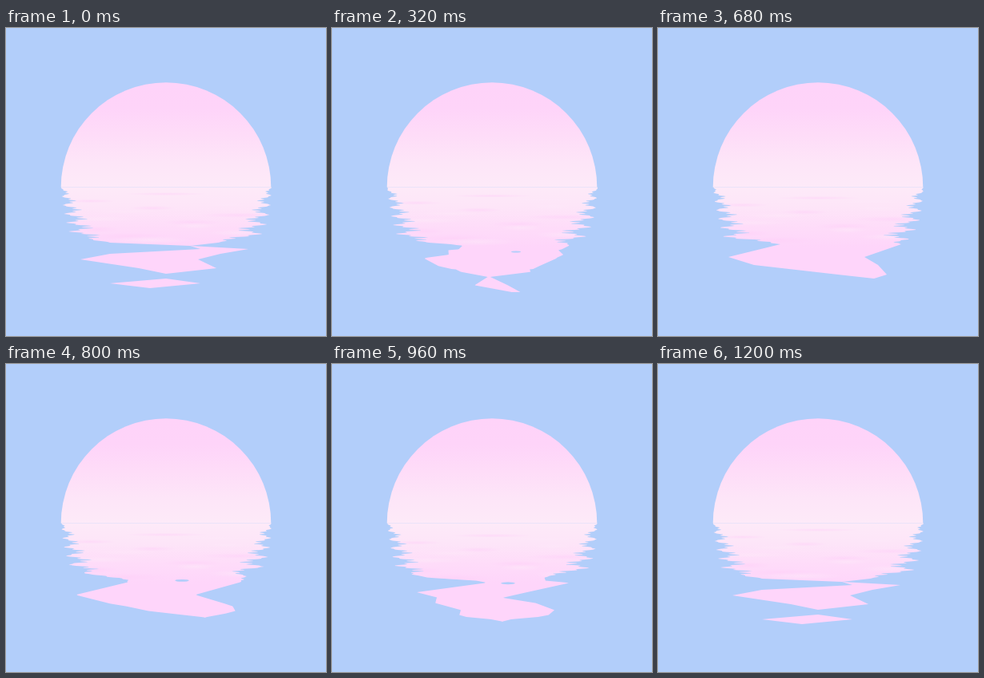
Animation, 400 px wide and 386 px high, one loop 1240 ms. Source, as an HTML page with a canvas:

```html
<!DOCTYPE html>
<html lang="en">
<head>
<meta charset="utf-8">
<title>Sun over water</title>
<style>
  html, body { margin: 0; height: 100%; overflow: hidden; background: #b2cefa; }
  canvas { display: block; }
</style>
</head>
<body>
<canvas id="stage" width="400" height="386"></canvas>
<script>
const ctx = document.getElementById('stage').getContext('2d');
const SKY = '#b2cefa', HORIZON = 199.5, BOTTOM = 331, CYCLE = 1200, STEP = 40;
const DRIFT = 0.00028; // waves come nearer: depth grows by this share per ms

// Near water as rows of [y, left, right], with an optional hole [x, y, radius].
const poses = [];
const pose = (time, rows, hole) => poses.push({ time, rows, hole });

pose(0, [[269,130,265], [273,230,230], [277,243,303], [283,130,268], [290,93,240],
  [301,166,263], [308,200,200], [314,200,200], [320,130,243], [326,180,180]]);
pose(160, [[269,130,290], [274,203,303], [284,95,280], [294,85,284], [301,115,289],
  [307,182,188], [317,149,232], [327,262,270]], [230,277,24]);
pose(480, [[276,190,302], [282,98,265], [288,158,290], [293,137,280], [307,200,215]]);
pose(680, [[271,153,304], [287,88,258], [297,120,275], [309,225,286], [314,270,270]]);
pose(880, [[264,110,286], [272,165,298], [291,86,222], [306,152,287], [312,165,289],
  [320,235,235]], [220,273,22]);
pose(1080, [[270,112,230], [274,225,225], [277,235,298], [289,93,235], [296,200,200],
  [303,152,262], [312,175,265], [321,141,235], [324,180,180]]);
poses.push({ ...poses[0], time: CYCLE });

const mix = (a, b, u) => a + (b - a) * u;
const move = (y, ms) => HORIZON + (y - HORIZON) * Math.exp(DRIFT * ms);

// Pointed ripples along the far water, one spacing further down each cycle.
function ripple(y, t) {
  const depth = Math.max(0, y - HORIZON), reach = Math.min(10, depth) + depth * .5;
  const notch = (first, gap) => {
    const p = (y - first) / gap - t / CYCLE;
    return reach * Math.abs(Math.sin(Math.PI * p)) * (.75 + .25 * Math.sin(2.1 * y + p));
  };
  return [
    69 + 25 * (depth / 92) ** 2 + notch(222, 11),
    332 - 24 * (depth / 75) ** 3 - notch(222, 12)
  ];
}

function edges(rows, y, far) {
  const [top] = rows[0], next = rows.findIndex(row => row[0] > y);
  if (next < 0) {
    const [, l, r] = rows[rows.length - 1];
    return [(l + r) / 2, (l + r) / 2];
  }
  const [y0, ...from] = next ? rows[next - 1] : [top - 7, ...far];
  const [y1, ...to] = rows[next];
  const u = Math.max(0, (y - y0) / (y1 - y0));
  return from.map((x, side) => mix(x, to[side], u));
}

function vertical(y0, y1, ...colors) {
  const g = ctx.createLinearGradient(0, y0, 0, y1);
  colors.forEach((color, i) => g.addColorStop(i / (colors.length - 1), color));
  return g;
}

const sunFill = vertical(68, 200, '#fed3f9', '#fed4f9', '#fedcf8', '#fde5f8', '#fdeaf8');
const waterFill = vertical(199, 275, '#fdeaf8', '#fde5f8', '#fedcf9', '#fed5fa');

function wisp(x, y, rx, ry, rgb) {
  ctx.save();
  ctx.translate(x, y);
  ctx.scale(rx, ry);
  const g = ctx.createRadialGradient(0, 0, 0, 0, 0, 1);
  g.addColorStop(0, `rgba(${rgb},.55)`);
  g.addColorStop(1, `rgba(${rgb},0)`);
  ctx.fillStyle = g;
  ctx.fillRect(-1, -1, 2, 2);
  ctx.restore();
}

function drawHole(hole, ms, size) {
  if (!hole || size <= 0) return;
  const [x, y, radius] = hole;
  ctx.fillStyle = SKY;
  ctx.beginPath();
  ctx.ellipse(x, move(y, ms), radius * size, radius * size / 6, 0, 0, 7);
  ctx.fill();
}

function drawWater(t) {
  const next = poses.findIndex(p => p.time > t);
  const a = poses[next - 1], b = poses[next];
  const since = t - a.time, until = b.time - t, u = since / (b.time - a.time);
  const lefts = [], rights = [];
  for (let y = HORIZON; y <= BOTTOM; y += .5) {
    const far = ripple(y, t);
    const ea = edges(a.rows, move(y, -since), far);
    const eb = edges(b.rows, move(y, until), far);
    let [l, r] = ea.map((x, side) => mix(x, eb[side], u));
    if (l > r) l = r = (l + r) / 2;
    lefts.push([l, y]);
    rights.unshift([r, y]);
  }
  ctx.save();
  ctx.beginPath();
  [...lefts, ...rights].forEach(p => ctx.lineTo(...p));
  ctx.closePath();
  ctx.fillStyle = waterFill;
  ctx.fill();
  ctx.clip();
  for (let i = 0; i < 14; i++) {
    const depth = (i + 2 * t / CYCLE) / 14 % 1;
    const x = 200 + 95 * Math.sin(i * 2.4);
    wisp(x, 208 + 62 * depth, 38 + 14 * Math.cos(i), 2 + 3 * depth, i % 2 ? '253,232,249' : '254,208,248');
  }
  ctx.restore();
  drawHole(a.hole, since, 1 - 1.5 * u);
  drawHole(b.hole, -until, 1.5 * u - .5);
}

function draw(now) {
  const t = Math.floor(now % (CYCLE + STEP) / STEP) * STEP % CYCLE;
  ctx.fillStyle = SKY;
  ctx.fillRect(0, 0, 400, 386);
  drawWater(t);
  ctx.fillStyle = sunFill;
  ctx.beginPath();
  ctx.arc(200, HORIZON, 131.3, Math.PI, 0);
  ctx.fill();
}

let start;
function tick(now) {
  start ??= now;
  draw(now - start);
  requestAnimationFrame(tick);
}
draw(0);
requestAnimationFrame(tick);
</script>
</body>
</html>
```
